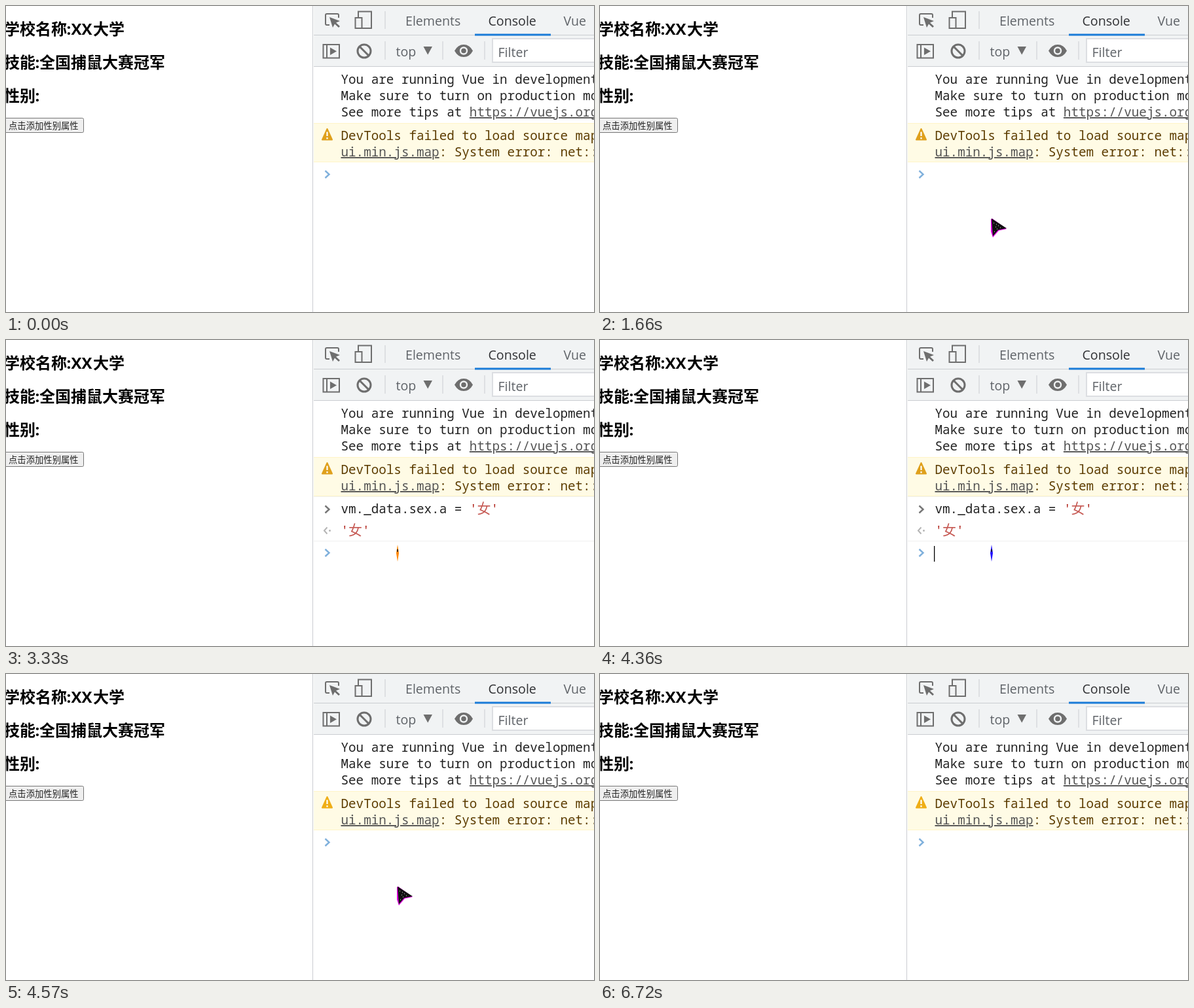
Write an HTML page that moves like this. It is 898 by 468 pixels and loops after 8 s.

```html
<!DOCTYPE html>
<html lang="zh">
<head>
<meta charset="utf-8">
<style>
  html, body { margin: 0; width: 100%; height: 100%; overflow: hidden; background: #fff; }
  svg { display: block; }
  text { white-space: pre; }
  .page { font: bold 24px "Open Sans", "Noto Sans CJK SC", sans-serif; }
  .button { font: 13.33px "Noto Sans CJK SC", sans-serif; fill: #222; }
  .ui { font: 19.6px "Open Sans", sans-serif; fill: #5f6368; }
  .mono { font: 19.25px "Noto Sans Mono", "Noto Sans CJK SC", monospace; fill: #222; }
  .mono .link { fill: #545454; text-decoration: underline; }
  .mono .string { fill: #b0241c; }
  .mono .han { font: 300 21px "Noto Sans CJK SC", sans-serif; fill: #c65a54; }
  .mono .warn { fill: #5c3c00; }
  .line { fill: none; stroke: #6e6e6e; stroke-width: 2; }
  .solid { fill: #6e6e6e; }
  .rule { stroke: #cacdd1; }
  .chevron { fill: none; stroke-width: 2.4; }
</style>
</head>
<body>
<svg width="898" height="468" viewBox="0 0 898 468">
  <defs>
    <path id="chevron" class="chevron" d="M-3.5 -5.5L2.5 0L-3.5 5.5"/>
    <text id="woman" class="mono"><tspan class="string">'<tspan class="han">女</tspan>'</tspan></text>
  </defs>

  <!-- Web page -->
  <g class="page">
    <text x="-3" y="44">学校名称</text><text x="92.5" y="44">:</text>
    <text x="99.5" y="44">XX</text><text x="133" y="44">大学</text>
    <text x="-3" y="95">技能</text><text x="44.5" y="95">:</text>
    <text x="51" y="95">全国捕鼠大赛冠军</text>
    <text x="-3" y="146">性别</text><text x="44.5" y="146">:</text>
  </g>
  <rect x="-3.5" y="171.5" width="122" height="22" rx="2" fill="#efefef" stroke="#767676"/>
  <text class="button" x="4" y="188">点击添加性别属性</text>

  <!-- Toolbars -->
  <rect x="470" width="428" height="93" fill="#f1f3f4"/>
  <path class="rule" d="M468.5 0V468M470 44.5H898M470 92.5H898M579 8V35M579 54V82M667 54V82M731 54V82"/>
  <rect x="716" y="42.5" width="116" height="3" fill="#1a7bd8"/>
  <g class="ui">
    <text x="610" y="30">Elements</text>
    <text x="736.5" y="30" style="fill:#303134">Console</text>
    <text x="851.5" y="30">Vue</text>
    <text x="595.5" y="77">top</text>
  </g>
  <rect x="743" y="50" width="170" height="36" fill="#fff" stroke="#dcdee2" stroke-width="2"/>
  <text class="ui" x="751.5" y="78">Filter</text>

  <path class="line" d="M494 29H490Q488 29 488 27V14Q488 12 490 12H506Q508 12 508 14V18"/>
  <path class="solid" d="M494 17L510 23L504 25.5L510 31L508 33L502 27.5L499 33Z"/>
  <path class="line" d="M538 17V8.5H558V34H544M533.5 18H543.5V34H533.5Z"/>
  <path class="line" d="M484.5 59H509V79.5H484.5ZM490 59V79.5"/>
  <path class="solid" d="M495 63.5L505 69.3L495 75Z"/>
  <g class="line" style="stroke-width:3"><circle cx="547" cy="69" r="10"/><path d="M540 62L554 76"/></g>
  <path class="solid" d="M637.5 62H651L644.2 74.5Z"/>
  <path class="solid" d="M685 68.5Q690 59 699 59T713 68.5Q708 78 699 78T685 68.5"/>
  <circle cx="699" cy="68.5" r="5" fill="none" stroke="#f1f3f4" stroke-width="2.4"/>

  <!-- Console -->
  <g id="log">
    <g class="mono">
      <text x="511.5" y="119">You are running Vue in development mode.</text>
      <text x="511.5" y="144">Make sure to turn on production mode</text>
      <text x="511.5" y="169">See more tips at <tspan class="link">https://vuejs.org/guide</tspan></text>
    </g>
    <rect x="470" y="179" width="428" height="60" fill="#fffbe5"/>
    <path d="M470 179.5H898M470 238.5H898" stroke="#fff5c8"/>
    <path id="alert" d="M490.5 188L498 204.5H483Z" stroke-width="2" stroke-linejoin="round"/>
    <path d="M490.5 192.5V199M490.5 201V203.5" stroke="#fff" stroke-width="2.2"/>
    <g class="mono">
      <text class="warn" x="511.5" y="205">DevTools failed to load source map: </text>
      <text class="warn" x="511.5" y="230"><tspan class="link">ui.min.js.map</tspan>: System error: net::ERR</text>
    </g>
  </g>
  <g id="command">
    <text class="mono" x="511.5" y="265">vm._data.sex.a = </text>
    <use href="#woman" x="708" y="265"/>
  </g>
  <g id="result">
    <path d="M470 239.5H898M470 307.5H898" stroke="#f0f0f0"/>
    <use href="#chevron" x="491" y="259" stroke="#757575"/>
    <path class="chevron" d="M490.5 286.5L486 291.5L490.5 296.5" stroke="#b5b5b5" style="stroke-width:2"/>
    <circle cx="494.5" cy="291.5" r="1.5" fill="#b5b5b5"/>
    <use href="#woman" x="511.5" y="298"/>
  </g>
  <use id="prompt" href="#chevron" x="491"/>
  <rect id="caret" width="1.3" height="24"/>

  <!-- Pointers -->
  <g id="arrow">
    <path class="tint" d="M-1 1L1 0L23 16L11 18.5L2 29L-1 20Z"/>
    <path d="M0 0L23 15L10 17.5L2 27L1 14Z" fill="#111"/>
    <path d="M3 7h1M7 9h1M10 11h1M6 13h1M13 14h1M8 16h1M4 20h1" stroke="#ddd"/>
  </g>
  <g id="beam">
    <path class="tint" d="M598 313L600 326L598 339L596 326Z"/>
    <path d="M598 320V324" stroke="#111" stroke-width="1.5"/>
  </g>
</svg>
<script>
const LOOP = 8000, STEP = 70, BLINK = 530;
const MOVE_IN = 500, RECALL = 1870, ENTER = 2800, RELOAD = 4430, RELOADED = 4570, HIDE = 5130;
const TINTS = ['#32f', '#f80', '#d0d', '#0bb', '#32f', '#f80', '#21f'];
// Pointer way points: time, x, y
const PATH = [
  [500, 882, 242], [720, 627, 258], [920, 416, 317], [1180, 598, 325],
  [4600, 598, 325], [5060, 621, 350]
];
const el = id => document.getElementById(id);
const show = (id, on) => el(id).style.display = on ? '' : 'none';
const within = (t, from, to) => t >= from && t < to;

function pointerAt(t) {
  const i = PATH.findIndex(p => p[0] > t);
  if (i < 1) return PATH[i < 0 ? PATH.length - 1 : 0].slice(1);
  const [t0, x0, y0] = PATH[i - 1], [t1, x1, y1] = PATH[i];
  const k = (t - t0) / (t1 - t0), e = k * k * (3 - 2 * k);
  return [x0 + (x1 - x0) * e, y0 + (y1 - y0) * e];
}

function caretOn(t) {
  if (t < RECALL) return false;
  if (t < ENTER) return t - RECALL < BLINK;
  if (t < RELOAD) return Math.floor((t - ENTER) / BLINK) % 2 === 0;
  return within(t, 5130, 5660) || within(t, 6260, 6720);
}

function draw(t) {
  const typed = within(t, RECALL, ENTER);
  const answered = within(t, ENTER, RELOAD);
  const cleared = within(t, RELOAD, RELOADED);
  const step = Math.max(0, Math.floor((t - MOVE_IN) / STEP));

  show('log', !cleared);
  show('command', typed || answered);
  show('result', answered);
  const alertColor = t < RELOAD ? '#dfa01c' : '#efae16';
  el('alert').setAttribute('fill', alertColor);
  el('alert').setAttribute('stroke', alertColor);

  const promptY = cleared ? 110 : answered ? 325.5 : 257.5;
  el('prompt').setAttribute('y', promptY);
  el('prompt').setAttribute('stroke', typed ? '#2f7fc8' : '#7fb0dc');

  show('caret', caretOn(t));
  el('caret').setAttribute('x', typed ? 751 : 510);
  el('caret').setAttribute('y', answered ? 315 : 246);

  show('beam', answered);
  show('arrow', within(t, MOVE_IN, HIDE) && !answered);
  const [x, y] = pointerAt(MOVE_IN + step * STEP);
  el('arrow').setAttribute('transform', `translate(${Math.round(x)} ${Math.round(y)})`);
  for (const tint of document.querySelectorAll('.tint'))
    tint.setAttribute('fill', TINTS[step % TINTS.length]);
}

const start = performance.now();
function frame() {
  draw((performance.now() - start) % LOOP);
  requestAnimationFrame(frame);
}
frame();
</script>
</body>
</html>
```
